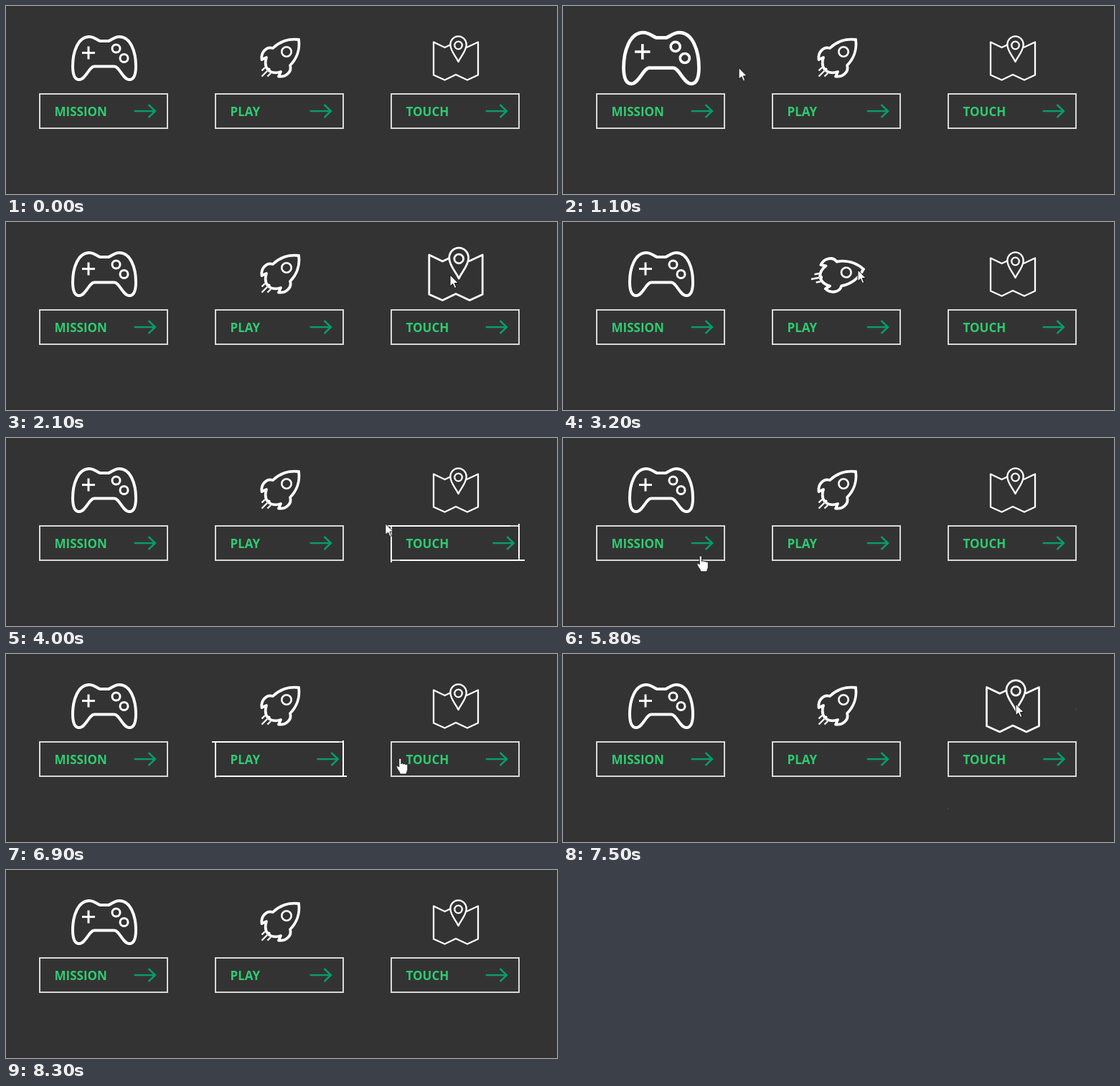
An HTML page for the animation above (9100 ms loop, 768 by 263 pixels).

```html
<!DOCTYPE html>
<html lang="en">
<head>
<meta charset="utf-8">
<title>Hover buttons</title>
<style>
/* --h is the hover progress of an icon or a button */
@property --h { syntax: "<number>"; inherits: true; initial-value: 0; }

html, body { margin: 0; width: 100%; height: 100%; overflow: hidden; background: #333; }
.stage { position: relative; width: 768px; height: 263px; overflow: hidden; background: linear-gradient(#333 258px, #353233 0); }
svg { position: absolute; overflow: visible; fill: none; }
.icons { left: 0; top: 0; stroke: #fff; stroke-linejoin: round; }

.icon, .button { animation: 9100ms ease infinite; }
.icon { transform: scale(calc(1 + .2 * var(--h))); }
.pad { transform-origin: 137px 73px; stroke-width: 4; animation-name: pad; }
.rocket { transform-origin: 382px 73px; stroke-width: 3.8; transform: scale(calc(1 + .2 * var(--h))) rotate(calc(360deg * var(--h))); animation-name: rocket; }
.map { transform-origin: 627px 73px; stroke-width: 2.3; animation-name: map; }

.button {
  position: absolute; top: 122px; width: 176px; height: 46px; border: 2px solid #d9d9d9;
  font: 700 17px/46px "Open Sans", "Noto Sans", sans-serif; color: #2ecc71;
}
.mission { left: 46px; animation-name: mission; }
.play { left: 291px; animation-name: play; }
.touch { left: 536px; animation-name: touch; }
.button span { position: absolute; left: 19.5px; top: 1px; }
.button svg { left: 130px; top: 13px; stroke: #0a9b69; stroke-width: 2.5; transform: translateX(calc(10px * var(--h))); }

.button i {
  --far-x: calc(-2px - 192px * (1 - var(--h)));
  --far-y: calc(-2px - 49px * (1 - var(--h)));
  position: absolute; background: rgb(255 255 255 / var(--h));
}
.top, .bottom { height: 2px; width: calc(180px * var(--h)); }
.left, .right { width: 2px; height: calc(50px * var(--h)); }
.top { top: -2px; left: var(--far-x); }
.bottom { bottom: -2px; right: var(--far-x); }
.right { right: -2px; top: var(--far-y); }
.left { left: -2px; bottom: var(--far-y); }

.cursor { left: 0; top: 0; fill: #fff; stroke: #111; stroke-linejoin: round; animation: move 9100ms linear infinite, show 9100ms step-end infinite; }
.arrow { animation: arrow 9100ms step-end infinite; }
.hand { animation: hand 9100ms step-end infinite; }

@keyframes pad {
  0%, 6.154% { --h: 0 } 8.352%, 11.978% { --h: 1 } 14.176%, to { --h: 0 }
}
@keyframes rocket {
  0%, 34.956% { --h: 0 } 37.154%, 39.505% { --h: 1 }
  41.703%, 44.89% { --h: 0 } 47.088%, 51.264% { --h: 1 } 53.462%, to { --h: 0 }
}
@keyframes map {
  0%, 19.67% { --h: 0 } 21.868%, 27.582% { --h: 1 }
  29.78%, 81.099% { --h: 0 } 83.297%, 86.264% { --h: 1 } 88.462%, to { --h: 0 }
}
@keyframes mission {
  0%, 63.626% { --h: 0 } 66.923%, 69.121% { --h: 1 } 72.418%, to { --h: 0 }
}
@keyframes play {
  0%, 69.725% { --h: 0 } 73.022%, 75.725% { --h: 1 } 79.022%, to { --h: 0 }
}
@keyframes touch {
  0%, 40.495% { --h: 0 } 43.791% { --h: 1 }
  47.088%, 75.769% { --h: 0 } 79.066%, 80.11% { --h: 1 } 83.407%, to { --h: 0 }
}
@keyframes show {
  0% { visibility: hidden } 2.198% { visibility: visible } 91.2%, to { visibility: hidden }
}
@keyframes hand {
  0% { opacity: 0 } 40.495% { opacity: 1 } 43.791% { opacity: 0 }
  63.626% { opacity: 1 } 69.121% { opacity: 0 } 69.725% { opacity: 1 } 80.11%, to { opacity: 0 }
}
@keyframes arrow {
  0% { opacity: 1 } 40.495% { opacity: 0 } 43.791% { opacity: 1 }
  63.626% { opacity: 0 } 69.121% { opacity: 1 } 69.725% { opacity: 0 } 80.11%, to { opacity: 1 }
}
@keyframes move {
  0%, 2.198% { transform: translate(654px, 22px) }
  3.297% { transform: translate(500px, 26px) }
  4.396% { transform: translate(345px, 22px) }
  5.495% { transform: translate(225px, 40px) }
  6.593% { transform: translate(165px, 62px) }
  7.692% { transform: translate(150px, 70px) }
  8.791%, 9.89% { transform: translate(145px, 72px) }
  10.989% { transform: translate(158px, 75px) }
  12.088% { transform: translate(244px, 87px) }
  13.187% { transform: translate(350px, 24px) }
  14.286% { transform: translate(460px, 15px) }
  15.385%, 17.582% { transform: translate(545px, 42px) }
  18.681% { transform: translate(570px, 46px) }
  19.78% { transform: translate(605px, 50px) }
  20.879% { transform: translate(650px, 52px) }
  21.978% { transform: translate(628px, 70px) }
  23.077%, 25.275% { transform: translate(619px, 74px) }
  27.473% { transform: translate(595px, 58px) }
  29.67% { transform: translate(545px, 40px) }
  31.868% { transform: translate(490px, 33px) }
  34.066% { transform: translate(430px, 55px) }
  35.165% { transform: translate(411px, 67px) }
  36.264% { transform: translate(392px, 72px) }
  37.363%, 38.462% { transform: translate(385px, 74px) }
  39.56% { transform: translate(420px, 78px) }
  40.659% { transform: translate(555px, 135px) }
  41.758% { transform: translate(600px, 146px) }
  42.857% { transform: translate(590px, 147px) }
  43.956% { transform: translate(530px, 120px) }
  45.055% { transform: translate(405px, 78px) }
  46.154% { transform: translate(388px, 72px) }
  47.253%, 48.352% { transform: translate(386px, 72px) }
  50.549% { transform: translate(402px, 80px) }
  51.648% { transform: translate(484px, 132px) }
  52.747% { transform: translate(491px, 142px) }
  53.846%, 56.044% { transform: translate(493px, 146px) }
  57.143% { transform: translate(488px, 160px) }
  58.242% { transform: translate(470px, 198px) }
  60.44% { transform: translate(340px, 222px) }
  62.637% { transform: translate(220px, 190px) }
  63.736% { transform: translate(192px, 165px) }
  65.934% { transform: translate(155px, 149px) }
  68.132% { transform: translate(150px, 148px) }
  69.231% { transform: translate(240px, 147px) }
  70.33% { transform: translate(318px, 147px) }
  72.527% { transform: translate(370px, 148px) }
  74.725% { transform: translate(445px, 147px) }
  75.824% { transform: translate(549px, 146px) }
  79.121% { transform: translate(612px, 147px) }
  80.22% { transform: translate(625px, 118px) }
  81.319% { transform: translate(630px, 80px) }
  83.516%, 84.615% { transform: translate(632px, 60px) }
  85.714% { transform: translate(650px, 55px) }
  87.912% { transform: translate(705px, 36px) }
  90.11%, to { transform: translate(742px, 28px) }
}
</style>
</head>
<body>
<div class="stage">
  <svg class="icons" width="768" height="263">
    <defs>
      <path id="half" stroke-linecap="round" d="M408 47C394 45 381 50 372 59C363 56 355 65 356.500 75L363 72C361 78 361.500 84 364 88L366.500 88.500"/>
    </defs>
    <g class="icon pad">
      <path d="M131 49H143C149 46 152 43 158 43C174 43 181 65 181 84C181 96 178 103 172 103C163 103 158 84.500 151 84.500H123C116 84.500 111 103 102 103C96 103 93 96 93 84C93 65 100 43 116 43C122 43 125 46 131 49Z"/>
      <path stroke-width="3" d="M106 65.500H124M115 56.500V74.500"/>
      <g stroke-width="3"><circle cx="153.500" cy="59.500" r="5.500"/><circle cx="164.500" cy="73" r="5.500"/></g>
    </g>
    <g class="icon rocket">
      <use href="#half"/>
      <use href="#half" transform="matrix(0 -1 -1 0 455 455)"/>
      <circle cx="391" cy="64" r="6.700" stroke-width="2.600"/>
      <path stroke-width="2.400" d="M356.500 90.500L361 86M356.500 98.500L364.500 90.500M364.500 98.500L369 94"/>
    </g>
    <g class="icon map">
      <path d="M620 54L611.500 58L596 50.500V96.500L611.500 103.500L627 96L643 103.500L658 96.500V50.500L642 58"/>
      <path d="M630.500 78C627 70 619.300 63 619.300 54A11.200 11.700 0 0 1 641.700 54C641.700 63 634 70 630.500 78Z"/>
      <circle cx="630.500" cy="55" r="5.300"/>
    </g>
  </svg>

  <div class="button mission">
    <span>MISSION</span>
    <svg width="34" height="22"><path d="M.700 10H30M20.500 1L30 10L20.500 19"/></svg>
    <i class="top"></i><i class="right"></i><i class="bottom"></i><i class="left"></i>
  </div>
  <div class="button play">
    <span>PLAY</span>
    <svg width="34" height="22"><path d="M.700 10H30M20.500 1L30 10L20.500 19"/></svg>
    <i class="top"></i><i class="right"></i><i class="bottom"></i><i class="left"></i>
  </div>
  <div class="button touch">
    <span>TOUCH</span>
    <svg width="34" height="22"><path d="M.700 10H30M20.500 1L30 10L20.500 19"/></svg>
    <i class="top"></i><i class="right"></i><i class="bottom"></i><i class="left"></i>
  </div>

  <svg class="cursor" width="20" height="24">
    <path class="arrow" d="M0 0V16L3.700 12.500L6.300 18.500L8.800 17.400L6.300 11.600H11.300Z"/>
    <path class="hand" d="M-1.700 1.500A1.700 1.700 0 0 1 1.700 1.500V8C1.700 6 4.700 6 4.700 8.300C4.700 6.800 7.700 6.800 7.700 9C7.700 7.600 10.700 7.600 10.700 10V15C10.700 17.500 9 18.500 9 22H0C0 18.500 -5 14.500 -5 11.700C-5 9.800 -3 9.900 -1.700 12Z"/>
  </svg>
</div>
</body>
</html>
```
